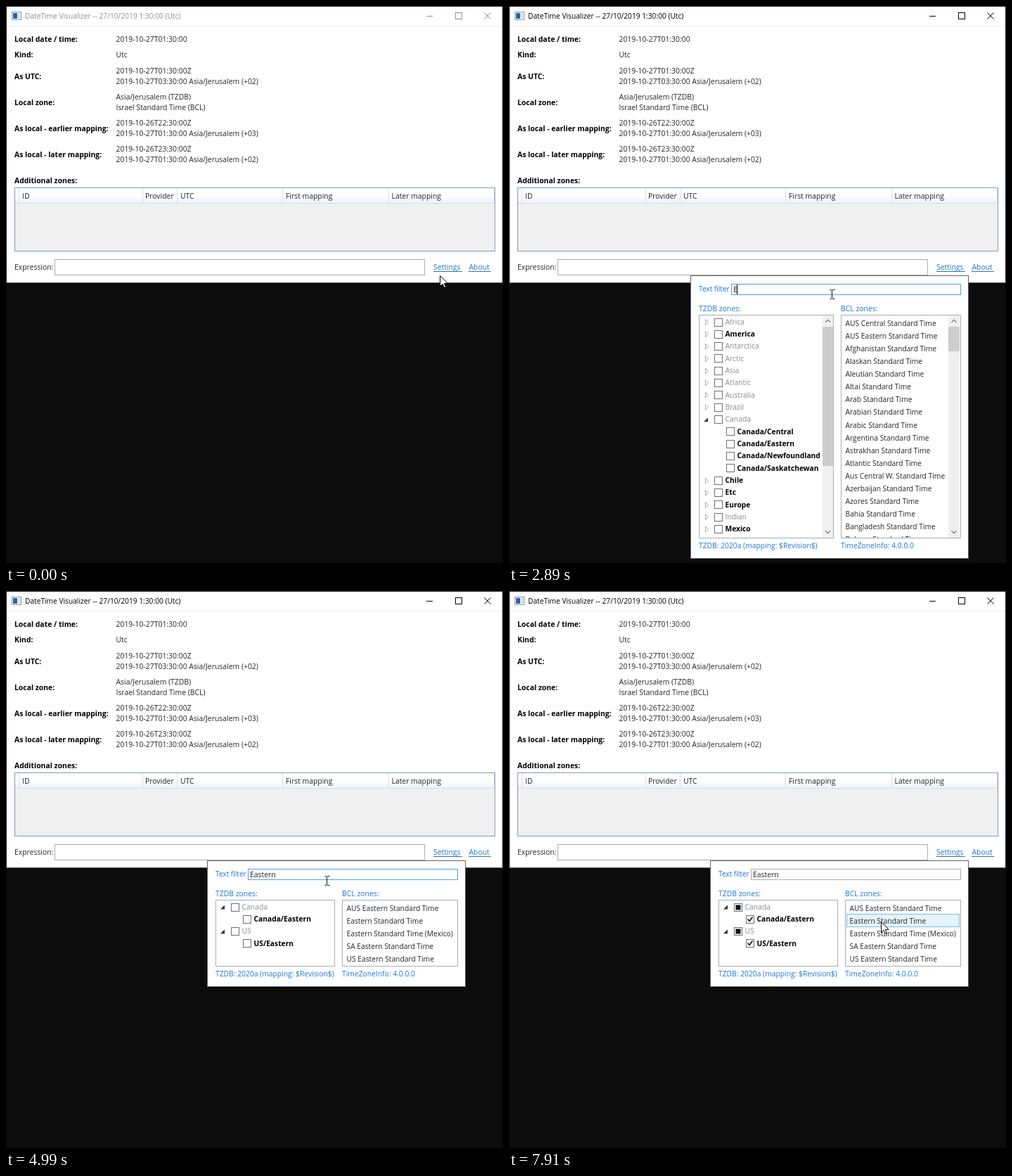
An HTML page with a canvas that plays this animation: 707 by 792 pixels, repeating every 8 s.

```html
<!DOCTYPE html>
<html lang="en">
<head>
<meta charset="utf-8">
<title>Time zone settings</title>
<style>
  html, body { margin: 0; width: 100%; height: 100%; overflow: hidden; background: #0c0c0c; }
  canvas { display: block; }
</style>
</head>
<body>
<canvas id="stage" width="707" height="792"></canvas>
<script>
const LOOP = 8000;
const ctx = document.getElementById('stage').getContext('2d');

const BLUE = '#1a78d2', INK = '#262626', BOX_LINE = '#abadb3', FRAME = '#646464';

const bclZones = [
  ...['AUS Central', 'AUS Eastern', 'Afghanistan', 'Alaskan', 'Aleutian', 'Altai', 'Arab', 'Arabian',
    'Arabic', 'Argentina', 'Astrakhan', 'Atlantic', 'Aus Central W.', 'Azerbaijan', 'Azores', 'Bahia',
    'Bangladesh', 'Belarus', 'Easter Island', 'Eastern'].map(n => n + ' Standard Time'),
  'Eastern Standard Time (Mexico)',
  ...['Korea', 'Middle East', 'North Asia East', 'North Korea', 'SA Eastern', 'US Eastern']
    .map(n => n + ' Standard Time')
];

const tzdbZones = {
  Africa: ['Algiers'], America: ['New_York'], Antarctica: ['Casey'], Arctic: ['Longyearbyen'],
  Asia: ['Yerevan'], Atlantic: ['Azores'], Australia: ['Melbourne'], Brazil: ['West'],
  Canada: ['Atlantic', 'Central', 'Eastern', 'Mountain', 'Newfoundland', 'Pacific', 'Saskatchewan', 'Yukon'],
  Chile: ['EasterIsland'], Etc: ['Greenwich'], Europe: ['Rome'], Indian: ['Reunion'],
  Mexico: ['General'], Pacific: ['Easter'], US: ['Eastern', 'East-Indiana']
};
const expanded = ['Canada', 'US'];

const typing = [[0, ''], [2740, 'E'], [3210, 'Ea'], [3360, 'Eas'], [3510, 'East'],
  [3670, 'Easte'], [3750, 'Easter'], [3890, 'Eastern']];
const caretOn = [[1730, 2270], [2740, 4520], [5050, 5580]];
const presses = [[400, 550], [1730, 1810], [6180, 6260], [7280, 7360]];

// Pointer moves: start, end, number of steps, target x, target y
const moves = [
  [80, 170, 2, 620, 377], [400, 400, 1, 620, 371], [1020, 1270, 4, 459, 409],
  [4990, 5710, 10, 352, 463], [5870, 5870, 1, 351, 464], [6030, 6030, 1, 349, 464],
  [6340, 6970, 9, 343, 503], [7060, 7060, 1, 344, 503], [7360, 7910, 8, 529, 470]
];

const within = (t, spans) => spans.some(([a, b]) => t >= a && t < b);

function pointerAt(t) {
  let x = 617, y = 383;
  for (const [start, end, steps, tx, ty] of moves) {
    if (t < start) break;
    const step = t >= end ? steps : 1 + Math.floor((t - start) / (end - start) * (steps - 1));
    const u = step / steps, ease = u * u * (3 - 2 * u);
    x += (tx - x) * ease;
    y += (ty - y) * ease;
  }
  return { x: Math.round(x), y: Math.round(y) };
}

function text(str, x, midY, color = INK, bold = false, size = 10.4) {
  ctx.font = `${bold ? 'bold ' : ''}${size}px "Open Sans", "Noto Sans", sans-serif`;
  ctx.fillStyle = color;
  ctx.fillText(str, x, Math.round(midY + 3.7));
  return ctx.measureText(str).width;
}

function fill(x, y, w, h, color) {
  ctx.fillStyle = color;
  ctx.fillRect(x, y, w, h);
}

function box(x, y, right, bottom, line, color = '#fff') {
  fill(x, y, right - x + 1, bottom - y + 1, line);
  fill(x + 1, y + 1, right - x - 1, bottom - y - 1, color);
}

function path(points, { stroke, fill: color, width = 1, close = false }) {
  ctx.beginPath();
  points.forEach(([x, y]) => ctx.lineTo(x, y));
  if (close) ctx.closePath();
  if (color) { ctx.fillStyle = color; ctx.fill(); }
  if (stroke) { ctx.strokeStyle = stroke; ctx.lineWidth = width; ctx.stroke(); }
}

function drawWindow(t) {
  const title = t < 400 ? '#8f8f8f' : '#000';
  box(0, 0, 706, 393, '#202020');
  fill(0, 393, 707, 1, FRAME);
  fill(1, 28, 705, 1, '#ececec');

  box(8, 8, 21, 19, '#8a949e');
  fill(10, 10, 6, 8, '#2a62a8');
  fill(17, 10, 3, 8, '#d5dbe2');
  text('DateTime Visualizer -- 27/10/2019 1:30:00 (Utc)', 27, 14, title, false, 10.2);
  fill(598, 14, 9, 1, title);
  box(639, 9, 648, 18, title);
  path([[680.5, 9.5], [689.5, 18.5]], { stroke: title });
  path([[689.5, 9.5], [680.5, 18.5]], { stroke: title });

  const fields = [
    ['Local date / time:', 47, '2019-10-27T01:30:00'],
    ['Kind:', 69.5, 'Utc'],
    ['As UTC:', 100, '2019-10-27T01:30:00Z', '2019-10-27T03:30:00 Asia/Jerusalem (+02)'],
    ['Local zone:', 137, 'Asia/Jerusalem (TZDB)', 'Israel Standard Time (BCL)'],
    ['As local - earlier mapping:', 174, '2019-10-26T22:30:00Z', '2019-10-27T01:30:00 Asia/Jerusalem (+03)'],
    ['As local - later mapping:', 211, '2019-10-26T23:30:00Z', '2019-10-27T01:30:00 Asia/Jerusalem (+02)']
  ];
  for (const [label, y, ...values] of fields) {
    text(label, 12, y, '#000', true);
    values.forEach((v, i) => text(v, 156.5, y + (values.length > 1 ? i * 14.5 - 7.5 : 0)));
  }

  text('Additional zones:', 12, 248, '#000', true);
  box(12, 258, 695, 348, '#7f9dbb', '#f0f0f0');
  const header = ctx.createLinearGradient(0, 259, 0, 280);
  header.addColorStop(0, '#fff');
  header.addColorStop(0.45, '#fff');
  header.addColorStop(1, '#f0f2f6');
  fill(13, 259, 682, 21, header);
  fill(13, 280, 682, 1, '#d5dbe4');
  [18, 194, 243, 393, 544, 694].forEach(x => fill(x, 259, 1, 21, '#d9dfe8'));
  [['ID', 23], ['Provider', 198], ['UTC', 248], ['First mapping', 398], ['Later mapping', 548.5]]
    .forEach(([label, x]) => text(label, x, 270));

  text('Expression:', 12, 371.5);
  box(69, 360, 595, 382, BOX_LINE);
  [['Settings', 608, 649, t >= 80 && t < 550], ['About', 658.5, 690, false]].forEach(([label, x, end, hover]) => {
    const color = hover ? '#f00' : '#1f78c0';
    text(label, x, 371.5, color);
    fill(Math.floor(x), 377, end - Math.floor(x), 1, color);
  });
}

function drawScrollbar(x, right, bottom, thumb) {
  const mid = (x + right) / 2;
  fill(x, 440, right - x, bottom - 440, '#f0f0f0');
  fill(x, 456, right - x, thumb, '#cdcdcd');
  const chevron = (y, d) =>
    path([[mid - 3.5, y + d], [mid, y - d], [mid + 3.5, y + d]], { stroke: '#707070', width: 1.2 });
  chevron(448, 1.8);
  chevron(748, -1.8);
}

function drawCheckbox(x, midY, mark, hover) {
  const y = Math.round(midY - 5.5);
  box(x, y, x + 11, y + 11, hover ? '#5593ff' : '#707070', hover ? '#f3f9ff' : '#fff');
  if (mark === 'check')
    path([[x + 2.5, y + 5.5], [x + 5, y + 8.5], [x + 9.5, y + 2.5]], { stroke: '#111', width: 1.7 });
  if (mark === 'partial') fill(x + 2.5, y + 2.5, 7, 7, '#111');
}

function treeRows(filter) {
  const matches = name => name.toLowerCase().includes(filter.toLowerCase());
  const rows = [];
  for (const [group, zones] of Object.entries(tzdbZones)) {
    const hits = zones.map(z => `${group}/${z}`).filter(matches);
    if (!hits.length && !matches(group)) continue;
    rows.push({ name: group, group, hit: matches(group) });
    if (expanded.includes(group)) hits.forEach(name => rows.push({ name, group, hit: true, leaf: true }));
  }
  return rows;
}

function drawTree(left, right, bottom, filter, t, pointer) {
  const checked = { 'Canada/Eastern': t >= 6260, 'US/Eastern': t >= 7360 };
  treeRows(filter).slice(0, 18).forEach(({ name, group, hit, leaf }, i) => {
    const y = 449 + i * 17.33, x = left + (leaf ? 51 : 34);
    const hover = leaf && t >= 5550 && pointer.x >= x && pointer.x < x + 16 && Math.abs(pointer.y - y) < 8;
    const mark = leaf ? checked[name] && 'check' : checked[group + '/Eastern'] && 'partial';
    if (!leaf) {
      if (expanded.includes(group))
        path([[left + 25, y - 2.5], [left + 25, y + 3.5], [left + 19, y + 3.5]], { fill: '#333', close: true });
      else
        path([[left + 21.5, y - 3.5], [left + 25.5, y + 0.5], [left + 21.5, y + 4.5]], { stroke: '#aaa', close: true });
    }
    drawCheckbox(x, y, mark, hover);
    const color = !filter ? INK : hit ? '#000' : '#8c8c8c', bold = Boolean(filter) && hit;
    text(name, x + 15.5, y, color, bold, bold ? 10.25 : 10.35);
  });
  if (filter.length < 2) drawScrollbar(right - 15, right, bottom, filter ? 198 : 139);
}

function drawBclList(x, bottom, zones, pointer, showHover) {
  zones.slice(0, 18).forEach((name, i) => {
    const y = 451 + i * 18.1, top = Math.floor(y - 9.3);
    if (showHover && pointer.x > x + 2 && pointer.x < 641 && pointer.y >= top && pointer.y < top + 18)
      box(x + 2, top, 640, top + 18, '#70c0e7', '#e5f3fb');
    text(name, x + 6.5, y, INK, false, 10.27);
  });
  if (zones.length > 17) drawScrollbar(625, 641, bottom, 35);
}

function clipped(x, y, right, bottom, draw) {
  ctx.save();
  ctx.beginPath();
  ctx.rect(x, y, right - x, bottom - y);
  ctx.clip();
  draw();
  ctx.restore();
}

function drawPopup(t, pointer) {
  const filter = typing.filter(([start]) => t >= start).pop()[1];
  const [left, bclLeft] = [[265, 471], [258, 472], [286, 478]][Math.min(filter.length, 2)];
  const zones = bclZones.filter(z => z.toLowerCase().includes(filter.toLowerCase()));
  const bottom = Math.min(785, Math.round(471 + zones.length * 18.1));
  const listBottom = bottom - 29, treeRight = bclLeft - 11, listRight = filter ? 642 : 641;
  const focused = t >= 1730 && t < 6180, hovered = t >= 1180 && t < 1730;

  ctx.save();
  if (t >= 2740 && t < 2815) ctx.translate(8, 0);
  box(left, 383, 653, bottom, FRAME);
  text('Text filter', left + 12, 402.5, BLUE, false, 10.1);
  box(left + 58, 395, listRight, 410, focused ? '#569de5' : hovered ? '#7eb4ea' : BOX_LINE);
  const typed = text(filter, left + 61, 403.5);
  if (within(t, caretOn)) fill(Math.round(left + 60.5 + typed), 396, 1, 14, '#000');

  text('TZDB zones:', left + 12, 430, BLUE);
  text('BCL zones:', bclLeft, 430, BLUE);
  box(left + 12, 439, treeRight, listBottom, BOX_LINE);
  box(bclLeft, 439, listRight, listBottom, BOX_LINE);
  clipped(left + 13, 440, treeRight, listBottom, () =>
    drawTree(left, treeRight, listBottom, filter, t, pointer));
  clipped(bclLeft + 1, 440, listRight, listBottom, () =>
    drawBclList(bclLeft, listBottom, zones, pointer, t >= 7280));
  text('TZDB: 2020a (mapping: $Revision$)', left + 12, bottom - 18, BLUE, false, 10.3);
  text('TimeZoneInfo: 4.0.0.0', bclLeft, bottom - 18, BLUE, false, 10.3);
  ctx.restore();
}

const arrow = [[0, 0], [0, 15], [3.5, 11.8], [6, 17], [8.2, 16], [5.8, 11], [10.6, 10.8]];
const hand = [[-1, 0], [1, 0], [2, 1.5], [2, 7], [5, 7], [8, 8], [11, 9], [12, 11], [12, 15], [10, 19],
  [10, 21], [0, 21], [-3, 17], [-6, 12], [-4, 11], [-2, 13], [-2, 1.5]];

function drawPointer(t, { x, y }) {
  if (within(t, presses)) {
    ctx.beginPath();
    ctx.arc(x - 2, y - (t < 550 ? 1 : 0), 13, 0, Math.PI * 2);
    ctx.fillStyle = 'rgba(250, 232, 20, 0.8)';
    ctx.fill();
  }
  if (t >= 3210 && t < 4990) return;
  ctx.save();
  ctx.translate(x + 0.5, y + 0.5);
  const overField = t >= 1020 && y >= 395 && y <= 411;
  if (overField) {
    path([[0, -6], [0, 7]], { stroke: '#111' });
    [-6, 7].forEach(dy => {
      path([[-3, dy], [-1, dy]], { stroke: '#111' });
      path([[1, dy], [4, dy]], { stroke: '#111' });
    });
  } else {
    path(t >= 80 && t < 550 ? hand : arrow, { stroke: '#000', fill: '#fff', close: true });
  }
  ctx.restore();
}

function render(now) {
  const t = now % LOOP, pointer = pointerAt(t);
  fill(0, 0, 707, 792, '#0c0c0c');
  drawWindow(t);
  if (t >= 550) drawPopup(t, pointer);
  drawPointer(t, pointer);
}

const began = performance.now();
function tick() {
  render(performance.now() - began);
  requestAnimationFrame(tick);
}
tick();
</script>
</body>
</html>
```
